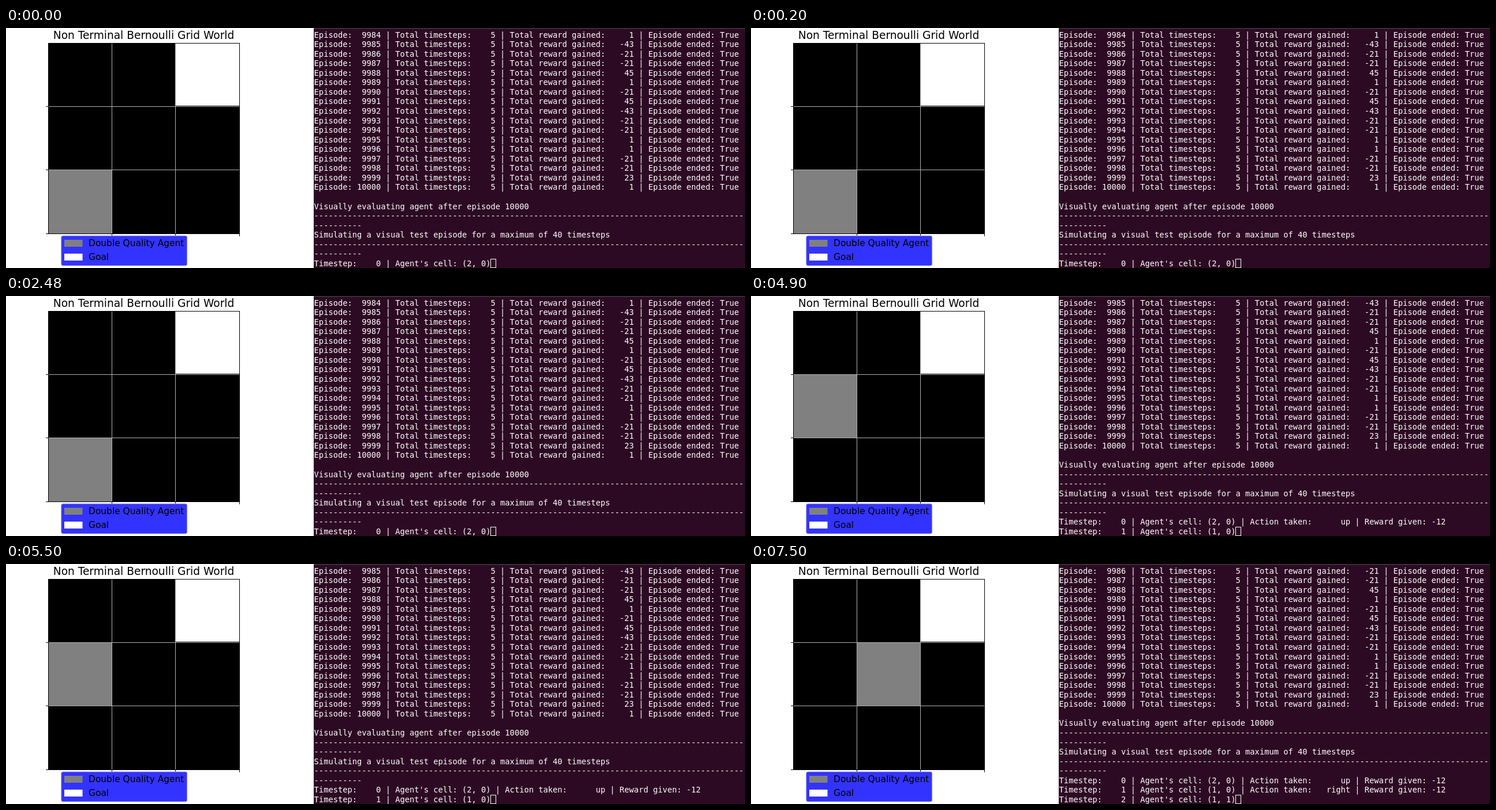
Recreate the animation shown at these times as an HTML page with a canvas. Size 1280 px wide and 417 px high, loop 8 s.

```html
<!DOCTYPE html>
<html lang="en">
<head>
<meta charset="utf-8">
<title>Grid world agent</title>
<style>
  html, body { margin: 0; width: 100%; height: 100%; overflow: hidden; background: #fff; }
  canvas { display: block; }
</style>
</head>
<body>
<canvas id="stage" width="1280" height="417"></canvas>
<script>
const ctx = document.getElementById('stage').getContext('2d');
const LOOP = 8000;

const GRID = { x: 73.3, y: 26.3, cell: 110.4, count: 3 };
const TERM = { x: 533, col: 8.277, row: 16.56, left: 533.6, baseline: 16.5, rows: 25 };

const steps = [
  { start: 0, cell: [2, 0], action: 'up', reward: -12 },
  { start: 4000, cell: [1, 0], action: 'right', reward: -12 },
  { start: 7500, cell: [1, 1] }
];
const rewards = [1, -43, -21, -21, 45, 1, -21, 45, -43, -21, -21, 1, 1, -21, -21, 23, 1];

const pad = (value, width) => String(value).padStart(width);
const rule = ['-'.repeat(90), '-'.repeat(10)];

const history = [
  ...rewards.map((reward, i) =>
    `Episode:${pad(9984 + i, 6)} | Total timesteps:${pad(5, 5)}` +
    ` | Total reward gained:${pad(reward, 6)} | Episode ended: True`),
  '',
  'Visually evaluating agent after episode 10000',
  ...rule,
  'Simulating a visual test episode for a maximum of 40 timesteps',
  ...rule
];

function rect(color, x, y, w, h) {
  ctx.fillStyle = color;
  ctx.fillRect(x, y, w, h);
}

function text(str, x, y, font, color, align = 'left') {
  ctx.font = font;
  ctx.fillStyle = color;
  ctx.textAlign = align;
  ctx.fillText(str, x, y);
}

function fillCell([row, col], color) {
  const { x, y, cell } = GRID;
  rect(color, Math.round(x + col * cell), Math.round(y + row * cell), 110, 110);
}

function drawGrid(agentCell) {
  const { x, y, cell, count } = GRID;
  const size = cell * count;
  text('Non Terminal Bernoulli Grid World', 238.5, 18.7,
    '18.6px "DejaVu Sans", sans-serif', '#000', 'center');

  rect('#000', 73, 26, 332, 332);
  fillCell([0, 2], '#fff');
  fillCell(agentCell, '#808080');
  rect('#000', 294, 135, 111, 1);

  for (let i = 1; i <= count; i++) {
    const px = Math.round(x + i * cell - 0.7);
    const py = Math.round(y + i * cell - 0.7);
    if (i < count) {
      rect('#b0b0b0', px, y, 1, size);
      rect('#b0b0b0', x, py, size, 1);
    }
    rect('#000', 69, py, 4, 1);
    rect('#000', px, 357, 1, 5);
  }
  ctx.strokeStyle = '#000';
  ctx.lineWidth = 1;
  ctx.strokeRect(73.5, 26.5, 331, 331);
}

function drawLegend() {
  ctx.beginPath();
  ctx.roundRect(95.7, 361, 218, 52, 3);
  ctx.fillStyle = '#3333ff';
  ctx.fill();
  ctx.strokeStyle = '#a5a5db';
  ctx.lineWidth = 1;
  ctx.stroke();
  [['Double Quality Agent', '#808080'], ['Goal', '#fff']].forEach(([label, color], i) => {
    const y = 368 + i * 24;
    rect(color, 101, y, 31.5, 12);
    text(label, 143, y + 11.3, '15.45px "DejaVu Sans", sans-serif', '#000');
  });
}

function stepLine(step, index, finished) {
  const [row, col] = step.cell;
  const line = `Timestep:${pad(index, 5)} | Agent's cell: (${row}, ${col})`;
  return finished
    ? `${line} | Action taken:${pad(step.action, 8)} | Reward given: ${step.reward}`
    : line;
}

function drawTerminal(current) {
  const { x, col, row, left, baseline, rows } = TERM;
  rect('#2d0a23', x, 0, 1280 - x, 417);
  rect('#3b3a36', x, 0, 1280 - x, 1.5);

  const log = steps.slice(0, current + 1).map((s, i) => stepLine(s, i, i < current));
  const lines = [...history, ...log].slice(-rows);
  const font = `${col / 0.60205}px "DejaVu Sans Mono", monospace`;
  lines.forEach((line, i) => text(line, left, baseline + i * row, font, '#fff'));

  ctx.strokeStyle = '#fff';
  ctx.lineWidth = 1;
  ctx.strokeRect(Math.round(left + log[current].length * col) - 0.5, 401.5, 9, 15);
}

function draw(time) {
  const current = steps.findLastIndex(step => time >= step.start);
  rect('#fff', 0, 0, 1280, 417);
  drawGrid(steps[current].cell);
  drawLegend();
  drawTerminal(current);
}

function tick() {
  draw(performance.now() % LOOP);
  requestAnimationFrame(tick);
}
tick();
</script>
</body>
</html>
```
